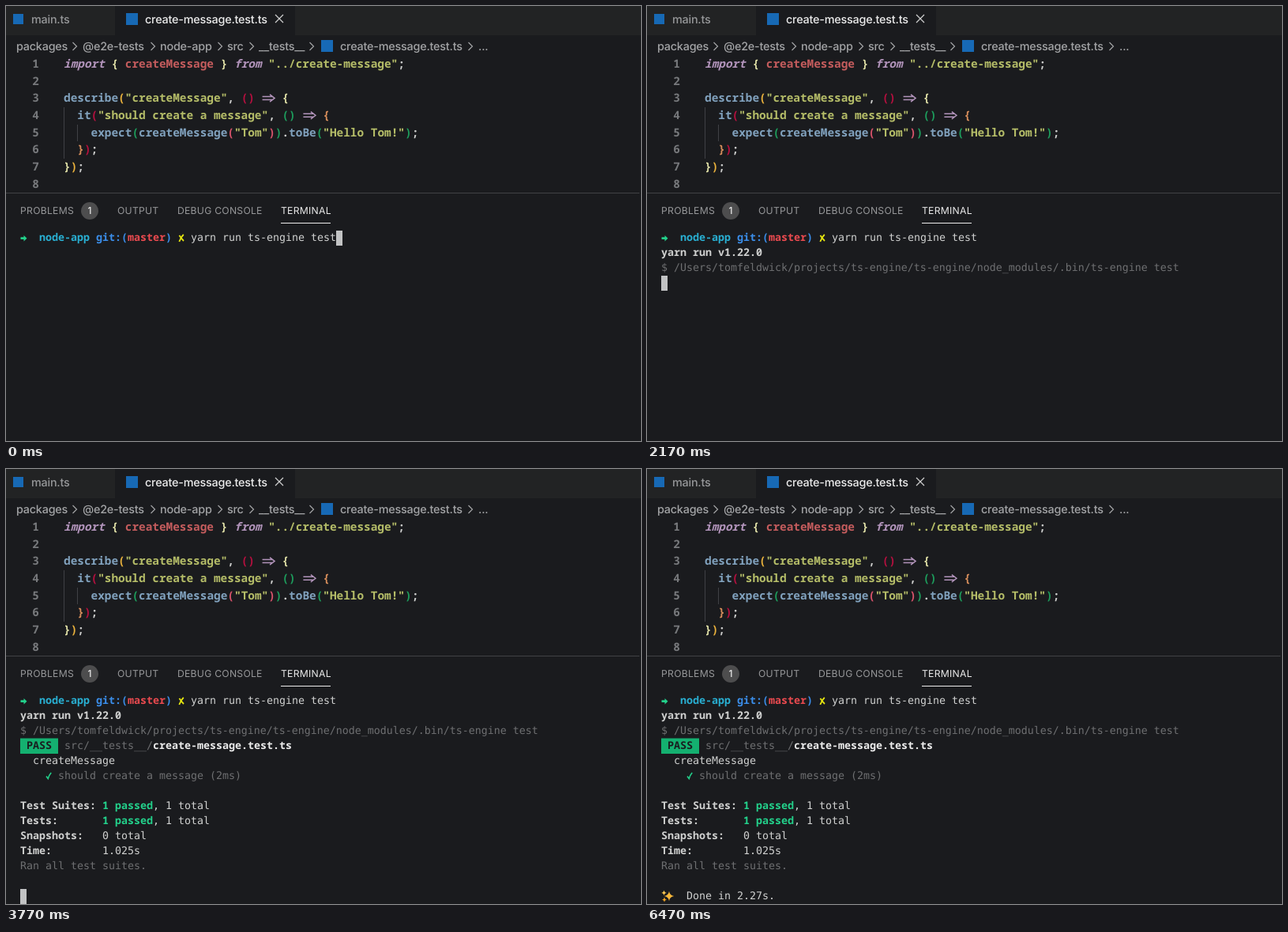
An HTML page for the animation above (7.01 s loop, 804x550 px).

```html
<!DOCTYPE html>
<html lang="en">
<head>
<meta charset="utf-8">
<title>Terminal test run</title>
<style>
  html, body { margin: 0; width: 100%; height: 100%; overflow: hidden; background: #1a1b1e; }
  svg { display: block; width: 804px; height: 550px; }
  text { white-space: pre; text-rendering: geometricPrecision; }
  .ui { font: 500 14.4px Inter, "Open Sans", sans-serif; letter-spacing: -.22px; }
  .panel { font: 12.2px Inter, "Open Sans", sans-serif; letter-spacing: .25px; }
  .code { font: 600 14.4px "Noto Sans Mono", "DejaVu Sans Mono", monospace; }
  .term { font: 13.29px "DejaVu Sans Mono", "Noto Sans Mono", monospace; }
  .bold { font: 700 13.333px "Noto Sans Mono", "DejaVu Sans Mono", monospace; }
  .italic { font-style: italic; }
</style>
</head>
<body>
<svg id="stage" viewBox="0 0 804 550"></svg>
<script>
const LOOP = 7010;
const CODE_CELL = 8.64, TERM_CELL = 8;
const C = {
  bg: '#1a1b1e', text: '#d0d1d0', dim: '#6e6f71', label: '#97989a', white: '#ececec',
  key: '#b294bb', name: '#c45c5d', str: '#b5bd68', fn: '#81a2be',
  gold: '#e9b13c', pink: '#b5103f', cream: '#dfdfa6', green: '#1d9d5c', peach: '#d98f5c', rose: '#d9536b',
  mint: '#23d18b', pass: '#14b070', cyan: '#29b0d3', blue: '#3b8eea', red: '#ea4a4f', yellow: '#e5e510', icon: '#1769b5'
};

const text = (x, y, s, fill, cls = '', more = '') =>
  `<text x="${x}" y="${y}" fill="${fill}" class="${cls}" ${more}>${s}</text>`;
const rect = (x, y, w, h, fill) => `<rect x="${x}" y="${y}" width="${w}" height="${h}" fill="${fill}"/>`;
const stroke = (d, color, width, x = 0, y = 0) =>
  `<path d="${d}" transform="translate(${x} ${y})" fill="none" stroke="${color}" stroke-width="${width}"/>`;

// Places [text, colour, class] parts on a fixed character grid.
function line(x, y, cell, parts, col = 0) {
  return parts.map(([s, color, cls]) => {
    const out = s.trim() ? text((x + col * cell).toFixed(2), y, s, C[color], cls) : '';
    col += s.length;
    return out;
  }).join('');
}

// Editor
const codeY = i => +(78 + i * 21.68).toFixed(2);
const code = (i, col, ...parts) => line(73, codeY(i), CODE_CELL, parts, col);
const fatArrow = (i, col) =>
  stroke('M1-2H13.5M1 2H13.5M10.5-4.6L16.5 0L10.5 4.6', C.key, 1.5, 73 + col * CODE_CELL, codeY(i) - 4.8);

const editor = '<g class="code">' +
  Array.from({ length: 8 }, (_, i) => text(42, codeY(i), i + 1, '#77797c', '', 'text-anchor="end"')).join('') +
  rect(73, 128, 1, 65, '#404145') + rect(90, 150, 1, 21, '#404145') +
  code(0, 0, ['import', 'key', 'italic'], [' ', 'text'], ['{', 'cream'], [' ', 'text'], ['createMessage', 'name'],
    [' ', 'text'], ['}', 'cream'], [' ', 'text'], ['from', 'key', 'italic'], [' ', 'text'],
    ['"../create-message"', 'str'], [';', 'text']) +
  code(2, 0, ['describe', 'fn'], ['(', 'gold'], ['"createMessage"', 'str'], [',', 'text'], [' ', 'text'],
    ['()', 'pink'], ['    ', 'text'], ['{', 'cream']) +
  fatArrow(2, 29) +
  code(3, 2, ['it', 'fn'], ['(', 'pink'], ['"should create a message"', 'str'], [',', 'text'], [' ', 'text'],
    ['()', 'green'], ['    ', 'text'], ['{', 'peach']) +
  fatArrow(3, 35) +
  code(4, 4, ['expect', 'fn'], ['(', 'green'], ['createMessage', 'fn'], ['(', 'rose'], ['"Tom"', 'str'],
    [')', 'rose'], [')', 'green'], ['.', 'text'], ['toBe', 'fn'], ['(', 'green'], ['"Hello Tom!"', 'str'],
    [')', 'green'], [';', 'text']) +
  code(5, 2, ['}', 'peach'], [')', 'pink'], [';', 'text']) +
  code(6, 0, ['}', 'cream'], [')', 'gold'], [';', 'text']) + '</g>';

// Tabs and breadcrumbs
const crumbs = [[13, 'packages'], [97, '@e2e-tests'], [195, 'node-app'], [280, 'src'], [320, '__tests__'],
  [423, 'create-message.test.ts'], [598, '...']];
const header = rect(0, 0, 804, 37, '#222324') + rect(138, 0, 228, 37, C.bg) +
  '<g class="ui">' +
  rect(9, 10, 13, 13, C.icon) + text(32, 21.6, 'main.ts', C.label) +
  rect(152, 9, 15, 15, C.icon) + text(176, 21.6, 'create-message.test.ts', C.white) +
  stroke('M341 11L351 21M351 11L341 21', '#d0d0d0', 1.2) +
  crumbs.map(([x, s]) => text(x, 56, s, '#a3a4a6')).join('') +
  [87, 186, 271, 311, 387, 588].map(x => stroke('M-2.5-5L2.5 0L-2.5 5', '#a3a4a6', 1.2, x, 51)).join('') +
  rect(399, 43, 15, 15, C.icon) + '</g>';

// Panel titles
const panel = rect(0, 236, 802, 1, '#414245') + '<g class="panel">' +
  text(18, 262.7, 'PROBLEMS', C.label) + text(141, 262.7, 'OUTPUT', C.label) +
  text(217, 262.7, 'DEBUG CONSOLE', C.label) + text(348, 262.7, 'TERMINAL', C.white) +
  rect(348, 274, 63, 1, C.white) + '<circle cx="106" cy="259" r="11" fill="#4d4d4e"/>' +
  text(106, 263, '1', '#fff', '', 'text-anchor="middle"') + '</g>';

// Terminal
const rowY = i => 284 + 19 * i;
const row = (i, col, ...parts) => line(18, rowY(i) + 13.3, TERM_CELL, parts, col);
const badge = (i, color, label) => rect(18, rowY(i) - .5, 48, 19.5, C[color]) + row(i, 1, [label, 'bg', 'bold']) +
  row(i, 7, ['src/__tests__/', 'dim'], ['create-message.test.ts', 'white', 'bold']);
const total = (i, label) => row(i, 0, [label.padEnd(13), 'text', 'bold'], ['1 passed', 'mint', 'bold'], [', 1 total', 'text']);
const star = (x, y, r, color) =>
  `<path transform="translate(${x} ${y}) scale(${r})" fill="${color}" d="M0-1Q.12-.12 1 0Q.12 .12 0 1Q-.12 .12-1 0Q-.12-.12 0-1"/>`;

const blocks = [
  { from: 0, body:
    `<path d="M18.5 292.3h4v-2.3l4 3.7-4 3.7v-2.3h-4z" fill="${C.mint}"/>` +
    row(0, 3, ['node-app', 'cyan', 'bold'], [' ', 'text'], ['git:(', 'blue', 'bold'], ['master', 'red', 'bold'], [')', 'blue', 'bold']) +
    stroke('M224.8 289Q221.5 292 219.3 298M219.4 290Q222 294 225 297', C.yellow, 1.8) +
    row(0, 27, ['yarn run ts-engine test', 'text']) },
  { from: 1530, body:
    row(1, 0, ['yarn run v1.22.0', 'text', 'bold']) +
    row(2, 0, ['$ /Users/tomfeldwick/projects/ts-engine/ts-engine/node_modules/.bin/ts-engine test', 'dim']) },
  { from: 2700, to: 3770, body: badge(4, 'yellow', 'RUNS') },
  { from: 3770, body:
    badge(3, 'pass', 'PASS') + row(4, 2, ['createMessage', 'text']) +
    stroke('M51 388.5L53.2 391.5Q54.5 387 57.2 384', C.mint, 1.6) +
    row(5, 6, ['should create a message (2ms)', 'dim']) +
    total(7, 'Test Suites:') + total(8, 'Tests:') +
    row(9, 0, ['Snapshots:   ', 'text', 'bold'], ['0 total', 'text']) +
    row(10, 0, ['Time:        ', 'text', 'bold'], ['1.025s', 'text']) +
    row(11, 0, ['Ran all test suites.', 'dim']) },
  { from: 3830, body:
    star(28, 540, 6.2, '#f8b83a') + star(21.5, 536, 3.4, '#f8c650') + star(22, 544.5, 3, '#f5a623') +
    row(13, 4, ['Done in 2.27s.', 'text']) }
];

// Block cursor: [time, row, column]
const stops = [[0, 0, 50], [1300, 1, 0], [1530, 3, 0], [2700, 5, 0], [3770, 13, 0], [3830, 14, 0]];

const stage = document.getElementById('stage');
stage.innerHTML = rect(0, 0, 804, 550, C.bg) + header + editor + panel + '<g class="term">' +
  blocks.map(b => `<g class="block">${b.body}</g>`).join('') + '</g>' +
  '<rect id="caret" width="8" height="19" fill="#c2c3c4"/>' +
  '<g id="mouse">' + stroke('M-3-7.5Q0-7.5 0-5.5V5.5Q0 7.5-3 7.5M3-7.5Q0-7.5 0-5.5M3 7.5Q0 7.5 0 5.5M-1.5 2.5H1.5', '#e4e4e4', 1.2) + '</g>';

const groups = [...stage.querySelectorAll('.block')];
const caret = document.getElementById('caret');
const mouse = document.getElementById('mouse');
const show = (el, on) => el.setAttribute('visibility', on ? 'visible' : 'hidden');

function draw(t) {
  blocks.forEach((b, i) => show(groups[i], t >= b.from && t < (b.to ?? LOOP)));

  const [, r, c] = stops.findLast(s => t >= s[0]);
  caret.setAttribute('x', 18 + c * TERM_CELL);
  caret.setAttribute('y', rowY(r));

  // The pointer sweeps right in a shallow arc, at 30 steps a second.
  show(mouse, t >= 5670 && t < 5830);
  const p = Math.floor((t - 5670) / 33) / 4;
  mouse.setAttribute('transform', `translate(${435.5 + 330 * p} ${539 - 40 * p + 50 * p * p})`);
}

const start = performance.now();
function tick() {
  draw((performance.now() - start) % LOOP);
  requestAnimationFrame(tick);
}
tick();
</script>
</body>
</html>
```
